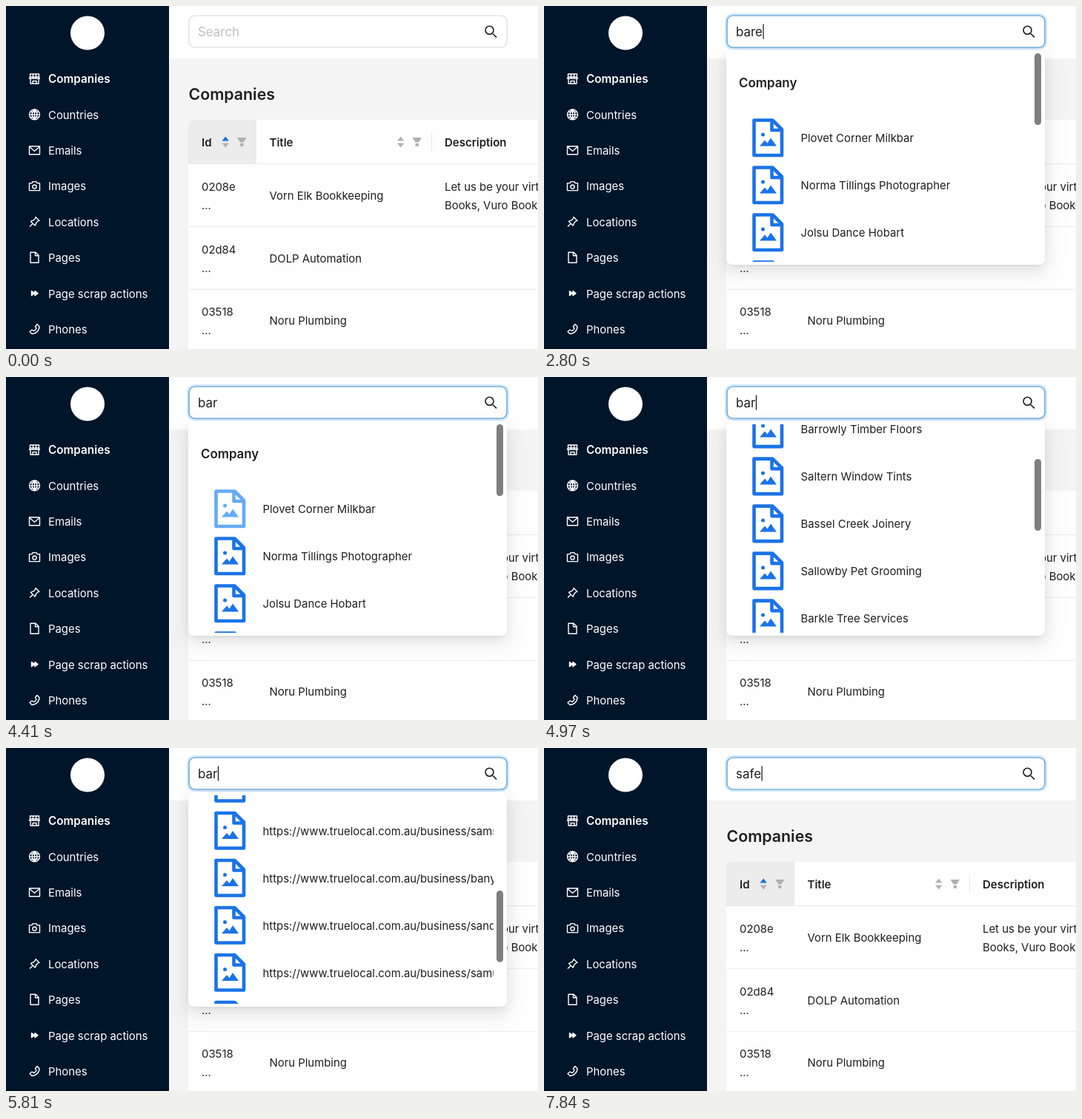
Recreate the animation shown at these times as an HTML page. Size 718x464 px, loop 8000 ms.

```html
<!DOCTYPE html>
<html lang="en">
<head>
<meta charset="utf-8">
<title>Company search</title>
<style>
html, body { margin: 0; width: 100%; height: 100%; overflow: hidden; background: #f4f4f4; }
svg { display: block; position: absolute; }
text { font: 14.9px Inter, "Open Sans", sans-serif; fill: #1f1f1f; white-space: pre; }
.semi { font-weight: 600; font-size: 15px; }
.title { font-weight: 600; font-size: 21.3px; }
.group { font-weight: 600; font-size: 16.9px; }
.input { font-size: 16.9px; }
.menu text { fill: #fff; }
.menu .semi { font-size: 15.3px; }
.menu path { fill: none; stroke: #fff; stroke-width: 1.4; stroke-linejoin: round; }
#drop { position: absolute; left: 246px; top: 60px; width: 430px; height: 290px; border-radius: 8px;
  background: #fff; transform-origin: 0 0;
  box-shadow: 0 3px 6px -4px rgba(0,0,0,.12), 0 6px 16px rgba(0,0,0,.08), 0 9px 28px 8px rgba(0,0,0,.05); }
#list { left: 0; top: 4px; }
#thumb { position: absolute; left: 416px; top: 4px; width: 9px; height: 97px; border-radius: 5px; background: #7f7f7f; }
</style>
</head>
<body>
<svg id="page" width="718" height="464"></svg>
<div id="drop">
  <svg id="list" width="412" height="282" viewBox="246 64 412 282"><g id="rows"></g></svg>
  <div id="thumb"></div>
</div>
<script>
const $ = id => document.getElementById(id);
const label = (x, y, s, cls = '') => `<text x="${x}" y="${y}" class="${cls}">${s}</text>`;
const rect = (x, y, w, h, fill) => `<rect x="${x}" y="${y}" width="${w}" height="${h}" fill="${fill}"/>`;
const shape = (d, fill) => `<path d="${d}" fill="${fill}"/>`;

// Menu icons are drawn around their centre.
const menu = [
  ['Companies', 'M-6 -6.5H6V-2.5H-6ZM-6 -2.5L-7 -.5H7L6 -2.5M-5.5 0V6.5H5.5V0M-2.5 6.5V3H2.5V6.5M-2 -6V-1M2 -6V-1'],
  ['Countries', 'M-7 0A7 7 0 1 1 7 0A7 7 0 1 1 -7 0ZM-7 0H7M0 -7V7M-6 -3.5H6M-6 3.5H6M0 -7C-4.5 -3 -4.5 3 0 7C4.5 3 4.5 -3 0 -7'],
  ['Emails', 'M-7 -5.5H7V5.5H-7ZM-7 -5L0 1L7 -5'],
  ['Images', 'M-7 -4H-3.5L-2.5 -6H2.5L3.5 -4H7V6H-7ZM-2.6 1A2.6 2.6 0 1 1 2.6 1A2.6 2.6 0 1 1 -2.6 1Z'],
  ['Locations', 'M1.5 -6.5L6.5 -1.5L4.5 -1L2 1.5C2 3 1.5 4 .5 5L-5 -.5C-4 -1.5 -3 -2 -1.5 -2L1 -4.5ZM-2.5 2.5L-6.5 6.5'],
  ['Pages', 'M-5.5 -7H1.5L5.5 -3V7H-5.5ZM1 -7V-2.5H5.5'],
  ['Page scrap actions', 'M-4 -3L0 0L-4 3ZM.5 -3L4.5 0L.5 3Z'],
  ['Phones', 'M3.5 -6.5L6.5 -3.5C6.5 2 2 6.5 -3.5 6.5L-6.5 3.5L-3.5 1L-1 2.5C.5 2 2 .5 2.5 -1L1 -3.5Z'],
].map(([name, d], i) => {
  const y = 99 + i * 48.36;
  return `<path transform="translate(38.5 ${y - .5})" d="${d}"${i == 6 ? ' style="fill:#fff"' : ''}/>` +
    label(57, y + 5.4, name, i ? '' : 'semi');
}).join('');

const sorter = (x, up) => shape(`M${x} 182.5l4.7 -6l4.7 6z`, up) + shape(`M${x} 185.5l4.7 6l4.7 -6z`, '#b3b3b3');
const funnel = x => shape(`M${x} 178h12.5l-4 6.2h-4.500zM${x + 4} 185.700h4.500v4h-4.500z`, '#b0b0b0');

const table = [['0208e', 'Vorn Elk Bookkeeping'], ['02d84', 'DOLP Automation'], ['03518', 'Noru Plumbing']]
  .map(([id, name], i) => {
    const y = 250 + i * 84.6;
    return label(264, y, id) + label(264, y + 25, '...') + label(355.5, y + 12.2, name) +
      rect(246, 298 + i * 85, 472, 1, '#ececec');
  }).join('');

$('page').innerHTML =
  rect(220, 0, 498, 71, '#fff') + rect(0, 0, 220, 464, '#001529') +
  '<circle cx="110" cy="36.500" r="23" fill="#fff"/>' +
  `<g class="menu">${menu}</g>` +
  label(246.5, 126.5, 'Companies', 'title') +
  shape('M246 464V162a8 8 0 0 1 8 -8H718V464Z', '#fefefe') +
  shape('M246 213V162a8 8 0 0 1 8 -8H338V213Z', '#ececec') +
  rect(246, 213, 472, 1, '#e8e8e8') + rect(574, 171, 1, 25, '#e8e8e8') +
  label(264, 189.5, 'Id', 'semi') + sorter(291.5, '#1f6fd6') + funnel(312) +
  label(355.5, 189.5, 'Title', 'semi') + sorter(528, '#b3b3b3') + funnel(548.5) +
  label(592, 189.5, 'Description', 'semi') + table +
  label(592, 250, 'Let us be your virtual office') + label(592, 274.7, 'Books, Vuro Bookkeeping') +
  `<rect id="glow" x="245.500" y="11.500" width="432" height="46" rx="9" fill="none" stroke="#1890ff" stroke-width="3"/>
   <rect x="247" y="13" width="429" height="43" rx="8" fill="#fff" stroke="#d5d5d5"/>
   <rect id="ring" x="247" y="13" width="429" height="43" rx="8" fill="none" stroke="#4f9fdb" stroke-width="1.2"/>
   <rect id="mark" x="259.500" y="21" height="26" fill="#b4d7fd"/>
   <text id="query" class="input" x="259" y="41"></text>
   <rect id="caret" y="24.500" width="1.200" height="20" fill="#111"/>
   <path d="M657 37.500l5 4.800M647 32.800a5.500 5.500 0 1 1 11 0a5.500 5.500 0 1 1 -11 0z" fill="none" stroke="#1a1a1a" stroke-width="1.600"/>`;

const firms = ['Plovet Corner Milkbar', 'Norma Tillings Photographer', 'Jolsu Dance Hobart', 'Brindle Pool Repairs',
  'Sandcot Garden Care', 'Barrowly Timber Floors', 'Saltern Window Tints', 'Bassel Creek Joinery',
  'Sallowby Pet Grooming', 'Barkle Tree Services'];
const slugs = ['saltwater', 'same-day', 'sand-soil', 'sack-bags', 'salvo', 'sail-shade', 'sams', 'bany', 'sand-works',
  'samu', 'satin', 'barn-doors', 'sash', 'bark-chips', 'sauna', 'basket', 'savour', 'banner'];

const row = (y, s) => `<g class="row" color="#1a73e8" transform="translate(281 ${y})">
  <path d="M2.500 -24H27.500L40 -11.500V23.500H2.500ZM26.500 -24V-10.500H40" fill="none" stroke="currentColor" stroke-width="4.600" stroke-linejoin="round"/>
  <path d="M10 11L17 3L20.500 7L25 0L33 11Z" fill="currentColor"/><circle cx="14.500" cy="-4.500" r="2.500" fill="currentColor"/>
  ${label(65.5, 5.5, s)}</g>`;
$('rows').innerHTML =
  label(263, 110, 'Company', 'group') + firms.map((s, i) => row(178.5 + i * 64, s)).join('') +
  label(263, 832, 'Page', 'group') +
  slugs.map((s, i) => row(900.5 + i * 64, 'https://www.truelocal.com.au/business/' + s)).join('');
const firstRow = document.querySelector('.row');

const LOOP = 8000, END_SCROLL = 1172.5;
const typed = [[0, ''], [1960, 'b'], [2100, 'ba'], [2240, 'bar'], [2450, 'bare'], [3850, 'bar'], [6580, ''],
  [7210, 's'], [7560, 'sa'], [7770, 'saf'], [7840, 'safe']];
const blinks = [1400, 3080, 3710, 4200, 4690, 5180, 5670, 6090, 6580, 7070, 7210];
const ramp = (t, from, len) => Math.min(1, Math.max(0, (t - from) / len));
const between = (t, a, b) => t >= a && t < b;

// Fast start when opening, slow start when closing.
const panel = (t, open, close) => (1 - (1 - ramp(t, open, 260)) ** 4) * (1 - ramp(t, close, 280) ** 4);

function draw(t) {
  const text = typed.filter(([at]) => t >= at).pop()[1];
  const query = $('query');
  query.textContent = text || 'Search';
  query.style.fill = text ? '#1f1f1f' : '#bfbfbf';
  const width = text ? query.getComputedTextLength() : 0;
  $('caret').setAttribute('x', 259.5 + width);
  $('caret').style.opacity = blinks.filter(at => t >= at).length % 2;
  $('mark').setAttribute('width', between(t, 6090, 6580) ? width : 0);

  const focus = ramp(t, 1360, 180);
  $('ring').style.opacity = focus;
  $('glow').style.opacity = focus * .2;

  const shown = Math.max(panel(t, 2460, 2866), panel(t, 4160, 6856));
  $('drop').style.opacity = shown;
  $('drop').style.transform = `scaleY(${.8 + .2 * shown})`;
  const scroll = END_SCROLL * ramp(t, 4690, 770);
  $('rows').setAttribute('transform', `translate(0 ${-scroll})`);
  $('thumb').style.transform = `translateY(${scroll / 9.1}px)`;
  firstRow.setAttribute('color', between(t, 4200, 5300) ? '#65abf6' : '#1a73e8');
}

const start = performance.now();
function tick() {
  draw((performance.now() - start) % LOOP);
  requestAnimationFrame(tick);
}
tick();
</script>
</body>
</html>
```
